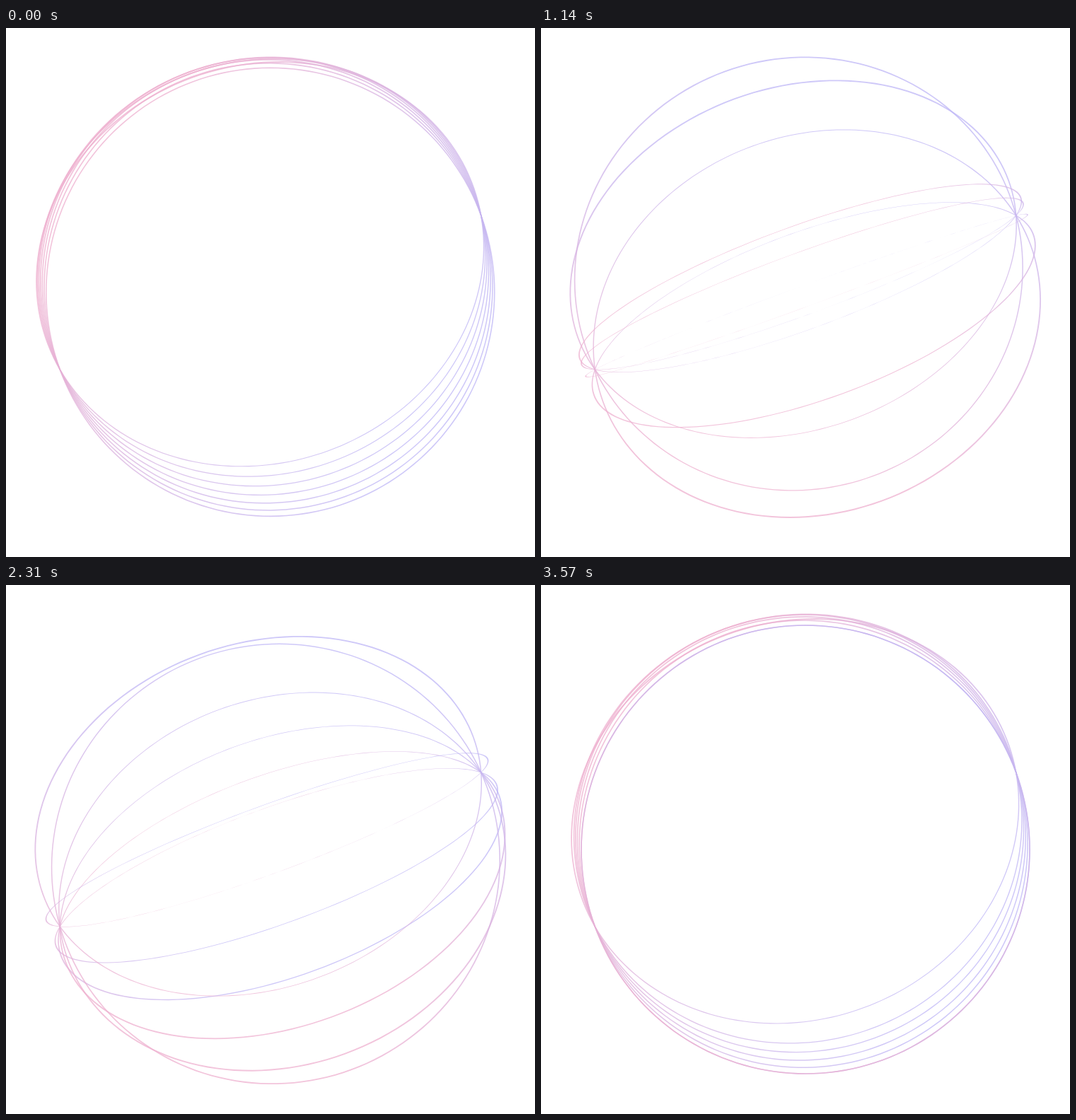
Animation, 748 px wide and 748 px high, one loop 3600 ms. Source, as an HTML page with a canvas:

```html
<!DOCTYPE html>
<html lang="en">
<head>
<meta charset="utf-8">
<title>Orbiting rings</title>
<style>
  html, body {
    margin: 0;
    width: 100%;
    height: 100%;
    overflow: hidden;
    background: #fff;
  }
  canvas { display: block; }
</style>
</head>
<body>
<canvas width="748" height="748"></canvas>
<script>
  const LOOP = 3600;
  const CENTER = 374;
  const RADIUS = 317;
  const LINE = 1.6;
  const DEPTH = 1045;               // viewer distance
  const TILT = 20.1 * Math.PI / 180; // slope of the shared axis
  const STEPS = 180;

  // Share of the loop at which each ring has made a half turn, and its last angle.
  const HALF = [.12, .25, .4, .55, .7, .85, .992];
  const LAST = [360, 365, 370, 375, 380, 390, 180];

  const ctx = document.querySelector('canvas').getContext('2d');
  const tint = ctx.createLinearGradient(-236, -160, 236, 160);
  tint.addColorStop(0, '#eeb0cf');
  tint.addColorStop(1, '#beb6f6');

  const mix = (a, b, k) => a + (b - a) * Math.min(Math.max(k, 0), 1);

  function angleOf(i, p) {
    const half = HALF[i];
    const end = .94 + i / 100;
    const deg = p < half
      ? mix(5 * i, 180, p / half)
      : mix(180, LAST[i], (p - half) / Math.max(end - half, .001));
    return deg * Math.PI / 180;
  }

  // Adds a circle turned about the x axis and seen in perspective.
  function addCircle(r, cos, sin) {
    for (let n = 0; n < STEPS; n++) {
      const a = n / STEPS * 2 * Math.PI;
      const s = r * Math.sin(a);
      const k = DEPTH / (DEPTH + s * sin);
      const x = r * Math.cos(a) * k;
      const y = s * cos * k;
      if (n) ctx.lineTo(x, y);
      else ctx.moveTo(x, y);
    }
    ctx.closePath();
  }

  function drawRing(angle) {
    const cos = Math.cos(angle);
    const sin = Math.sin(angle);
    ctx.save();
    ctx.translate(CENTER, CENTER);
    ctx.rotate(-TILT);
    ctx.beginPath();
    addCircle(RADIUS + LINE / 2, cos, sin);
    addCircle(RADIUS - LINE / 2, cos, sin);
    // The gradient turns with the ring.
    ctx.scale(1, cos);
    ctx.rotate(TILT);
    ctx.fill('evenodd');
    ctx.restore();
  }

  function draw(ms) {
    const p = ms % LOOP / LOOP;
    ctx.clearRect(0, 0, 748, 748);
    ctx.globalAlpha = .75;
    ctx.fillStyle = tint;
    HALF.forEach((_, i) => drawRing(angleOf(i, p)));
  }

  const start = performance.now();
  function tick() {
    draw(performance.now() - start);
    requestAnimationFrame(tick);
  }
  tick();
</script>
</body>
</html>
```
